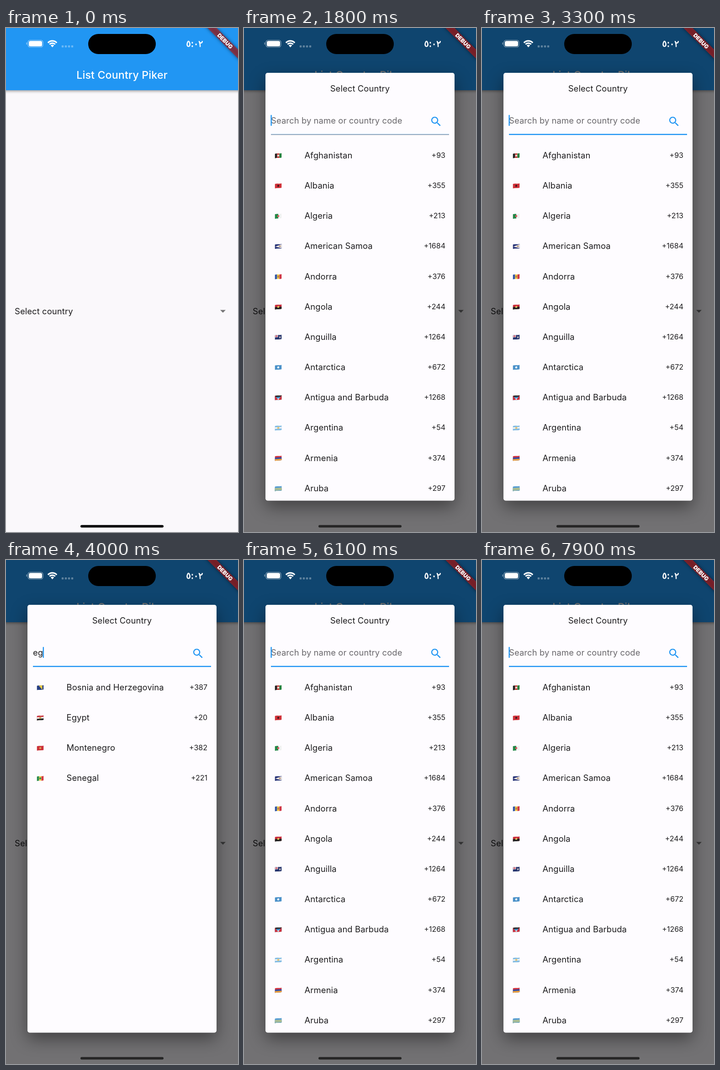
Animation, 508 px wide and 1102 px high, one loop 8 s. Source, as an HTML page with a canvas:

```html
<!DOCTYPE html>
<html lang="en">
<head>
<meta charset="utf-8">
<title>Country picker</title>
<style>
html, body { margin: 0; width: 100%; height: 100%; overflow: hidden; background: #faf8fb; }
canvas { display: block; width: 508px; height: 1102px; }
</style>
</head>
<body>
<canvas id="stage" width="508" height="1102"></canvas>
<script>
const ctx = document.getElementById('stage').getContext('2d');
const W = 508, H = 1102, LOOP = 8000, U = 1.1814;
const BLUE = '#2196f3', INK = '#1d1c1e';

// name | dial code | stripe direction | stripe colours | emblem and its colour
const countries = `
Afghanistan|93|v|#222,#c8322f,#24803c|dot #e9d5cf
Albania|355|h|#cf3038|dot #45191d
Algeria|213|v|#238746,#f1f1f1|dot #d95a62
American Samoa|1684|h|#283477|fly #f1e9e5
Andorra|376|v|#3155a5,#f2c83c,#cf3542|dot #b98a44
Angola|244|h|#c92b3b,#222|dot #dfb957
Anguilla|1264|h|#27366f|jack #c94455
Antarctica|672|h|#4b91c9|dot #f5f7f9
Antigua and Barbuda|1268|h|#222,#4295cf,#f4f4f4|sides #ce2f3d
Argentina|54|h|#83bce3,#f3f5f7,#83bce3|dot #e3c579
Armenia|374|h|#d33440,#3449a2,#eda23b|
Aruba|297|h|#5b9fd2,#5b9fd2,#5b9fd2,#e6d461,#5b9fd2,#e6d461,#5b9fd2|
Azerbaijan|994|h|#36a5ce,#d33b49,#459b4c|dot #f1dfe1
Belarus|375|h|#c9343e,#c9343e,#348c47|
Belgium|32|v|#222,#f0cd42,#d6394a|
Belize|501|h|#cf3441,#294e9c,#294e9c,#294e9c,#cf3441|dot #eee
Benin|229|h|#f0d44a,#d63b45|hoist #278a52
Bermuda|1441|h|#cf3441|jack #354985
Bosnia and Herzegovina|387|h|#273f83|wedge #eccb45
Brunei Darussalam|673|h|#edd34a,#eee,#333,#edd34a|dot #cc3d42
Egypt|20|h|#c93541,#f3f3f3,#252525|dot #cfa65b
Montenegro|382|h|#cb3039|dot #d9a34d
Senegal|221|v|#278b4b,#efd047,#d43942|dot #3c914c`
  .trim().split('\n').map(line => {
    const [name, code, dir, colours, emblem] = line.split('|');
    return { name, code, dir, colours: colours.split(','), emblem: emblem.split(' ') };
  });

const search = query =>
  countries.filter(c => c.name.toLowerCase().includes(query)).slice(0, 12);

const clamp = v => Math.max(0, Math.min(1, v));
const progress = (t, start, length) => clamp((t - start) / length);

function rect(x, y, w, h, fill, r = 0) {
  ctx.fillStyle = fill;
  ctx.beginPath();
  ctx.roundRect(x, y, w, h, r);
  ctx.fill();
}

function poly(fill, ...points) {
  ctx.fillStyle = fill;
  ctx.beginPath();
  points.forEach(([x, y]) => ctx.lineTo(x, y));
  ctx.fill();
}

function text(str, x, y, size, { fill = INK, align = 'left', weight = 400, spacing = 0.1 } = {}) {
  ctx.font = `${weight} ${size}px Inter, sans-serif`;
  ctx.letterSpacing = spacing + 'px';
  ctx.textAlign = align;
  ctx.fillStyle = fill;
  ctx.fillText(str, x, y);
}

const emblems = {
  dot(c) { ctx.fillStyle = c; ctx.beginPath(); ctx.arc(7.5, 5, 2.3, 0, 7); ctx.fill(); },
  fly(c) { poly(c, [1, 5], [15, .8], [15, 9.2]); rect(9, 4, 4, 2, '#94704e'); },
  wedge(c) { poly(c, [4, 0], [12, 0], [12, 10]); },
  hoist(c) { rect(0, 0, 6, 10, c); },
  sides(c) { poly(c, [0, 0], [7.5, 10], [0, 10]); poly(c, [15, 0], [7.5, 10], [15, 10]); },
  jack(c) {
    rect(0, 0, 7, 5, '#e8dfe5');
    rect(0, 2, 7, 1.2, c);
    rect(3, 0, 1.2, 5, c);
    rect(10, 3.5, 2.5, 4, '#e6dccb', 1);
  }
};

function flag({ dir, colours, emblem: [kind, tint] }, y) {
  ctx.save();
  ctx.transform(1, -.07, 0, 1, 67.5, y);
  ctx.beginPath();
  ctx.moveTo(0, .4);
  ctx.bezierCurveTo(5, -1, 9, 1.4, 15, 0);
  ctx.lineTo(15, 9.8);
  ctx.bezierCurveTo(9, 11.2, 5, 9, 0, 10.4);
  ctx.clip();
  const n = colours.length;
  colours.forEach((c, i) => dir === 'v'
    ? rect(i * 15 / n, -2, 15 / n, 14, c)
    : rect(0, i ? i * 10 / n : -2, 15, 12, c));
  if (kind) emblems[kind](tint);
  ctx.restore();
}

function page(t) {
  rect(0, 0, W, H, '#faf8fb');
  ctx.save();
  ctx.shadowColor = 'rgba(0,0,0,.4)';
  ctx.shadowBlur = 6;
  ctx.shadowOffsetY = 2;
  rect(-10, 0, W + 20, 136, BLUE);
  ctx.restore();
  text('List Country Piker', W / 2, 111, 23.2, { fill: '#fff', align: 'center', weight: 500, spacing: .15 });
  text('Select country', 19, 626, 18.4);
  const ripple = progress(t, 480, 80) * (1 - progress(t, 690, 100));
  rect(462, 605, 28, 29, `rgba(0,0,0,${.06 * ripple})`);
  poly('#757476', [469, 616.6], [481, 616.6], [475, 622.5]);
}

// Blink over one second: solid, fade out, hidden, fade in
function blink(ms) {
  const p = ms % 1000 / 1000;
  if (p < .5) return 1;
  return p < .85 ? 1 - clamp((p - .5) / .15) : (p - .85) / .15;
}

const magnifier = new Path2D('M15.5 14h-.79l-.28-.27C15.41 12.59 16 11.11 16 9.5 16 5.91 13.09 3 9.5 3S3 5.91 3 9.5 5.91 16 9.5 16c1.61 0 3.09-.59 4.23-1.57l.27.28v.79l5 4.99L20.49 19l-4.99-5zm-6 0C7.01 14 5 11.99 5 9.5S7.01 5 9.5 5 14 7.01 14 9.5 11.99 14 9.5 14z');

// Moments at which the field changes
const edits = [
  { at: 0, query: '' },
  { at: 1800, query: '', focus: true },
  { at: 3400, query: 'e', focus: true },
  { at: 3700, query: 'eg', focus: true },
  { at: 4300, query: 'egy', focus: true },
  { at: 5150, query: 'egy', focus: true, selected: true },
  { at: 5850, query: '', focus: true }
];

function field(t, { at, query, focus, selected }) {
  text(query || 'Search by name or country code', 59, 208.5, 18.4, { fill: query ? INK : '#69676b' });
  const width = query ? ctx.measureText(query).width : 0;
  if (selected) {
    rect(59, 190, width, 23, '#a6d5fa');
    text(query, 59, 208.5, 18.4);
  } else if (focus) {
    ctx.save();
    ctx.globalAlpha = blink(t - at);
    rect(58.4 + width, 190, 2.4, 24, BLUE, 1);
    ctx.restore();
  }

  const p = progress(t, 1750, 167);
  rect(59, 232.5, 390, 1.2, '#858387');
  if (p) {
    ctx.save();
    ctx.globalAlpha *= p;
    rect(59, 231.6, 390, 1.2 + 1.2 * p, BLUE);
    ctx.restore();
  }

  ctx.save();
  ctx.translate(406.4, 190.4);
  ctx.scale(U, U);
  ctx.fillStyle = focus ? BLUE : '#858387';
  ctx.fill(magnifier);
  ctx.restore();
}

function dialog(t) {
  const fade = 1 - (1 - progress(t, 490, 250)) ** 1.85;
  if (!fade) return;
  rect(0, 0, W, H, `rgba(0,0,0,${.54 * fade})`);
  ctx.save();
  ctx.globalAlpha = fade;
  ctx.save();
  ctx.shadowColor = 'rgba(0,0,0,.42)';
  ctx.shadowBlur = 36;
  ctx.shadowOffsetY = 14;
  rect(47, 98, 414, 935.5, '#fefcff', 4.7);
  ctx.restore();

  const state = edits.findLast(e => t >= e.at);
  text('Select Country', W / 2, 138.5, 18.4, { align: 'center' });
  field(t, state);
  search(state.query).forEach((country, i) => {
    const y = i * 56 * U;
    flag(country, y + 274.5);
    text(country.name, 132.5, y + 285, 18.4);
    text('+' + country.code, 441, y + 284, 16, { align: 'right', spacing: 0 });
  });
  ctx.restore();
}

function statusBar(t) {
  rect(44.5, 31.5, 1.6, 5, 'rgba(255,255,255,.5)', 1);
  ctx.strokeStyle = 'rgba(255,255,255,.5)';
  ctx.lineWidth = 1.2;
  ctx.beginPath();
  ctx.roundRect(48, 26.5, 33, 15.5, 5);
  ctx.stroke();
  rect(50, 28.3, 29, 12, '#fff', 3.5);

  ctx.strokeStyle = '#fff';
  ctx.lineWidth = 3.2;
  for (const r of [8.4, 13.3]) {
    ctx.beginPath();
    ctx.arc(101.5, 41.5, r, -Math.PI * .76, -Math.PI * .24);
    ctx.stroke();
  }
  ctx.fillStyle = '#fff';
  ctx.beginPath();
  ctx.moveTo(101.5, 42.3);
  ctx.arc(101.5, 41.5, 5, -Math.PI * .76, -Math.PI * .24);
  ctx.fill();
  for (let i = 0; i < 4; i++) rect(121.8 + i * 7, 38, 4.4, 4.4, 'rgba(255,255,255,.33)', 1);

  ctx.font = '19px "DejaVu Sans", sans-serif';
  ctx.letterSpacing = '0px';
  ctx.textAlign = 'center';
  ctx.lineWidth = .8;
  ctx.fillStyle = '#fff';
  ctx.fillText('٥:٠٢', 413, 41);
  ctx.strokeText('٥:٠٢', 413, 41);

  rect(180, 13, 148, 44, '#000', 22);
  const tone = 38 * progress(t, 490, 210);
  rect(163, 1086.7, 182, 5.6, `rgb(${tone},${tone},${tone})`, 2.8);
}

function banner() {
  ctx.save();
  ctx.translate(W, 0);
  ctx.rotate(Math.PI / 4);
  ctx.scale(U, U);
  ctx.save();
  ctx.shadowColor = 'rgba(0,0,0,.8)';
  ctx.shadowBlur = 7;
  rect(-50, 28, 100, 12, 'rgba(183,28,28,.627)');
  ctx.restore();
  text('DEBUG', 0, 37.7, 10.2, { fill: '#fff', align: 'center', weight: 900, spacing: 0 });
  ctx.restore();
}

function draw(now) {
  const t = now % LOOP;
  page(t);
  dialog(t);
  statusBar(t);
  banner();
  requestAnimationFrame(draw);
}
requestAnimationFrame(draw);
</script>
</body>
</html>
```
